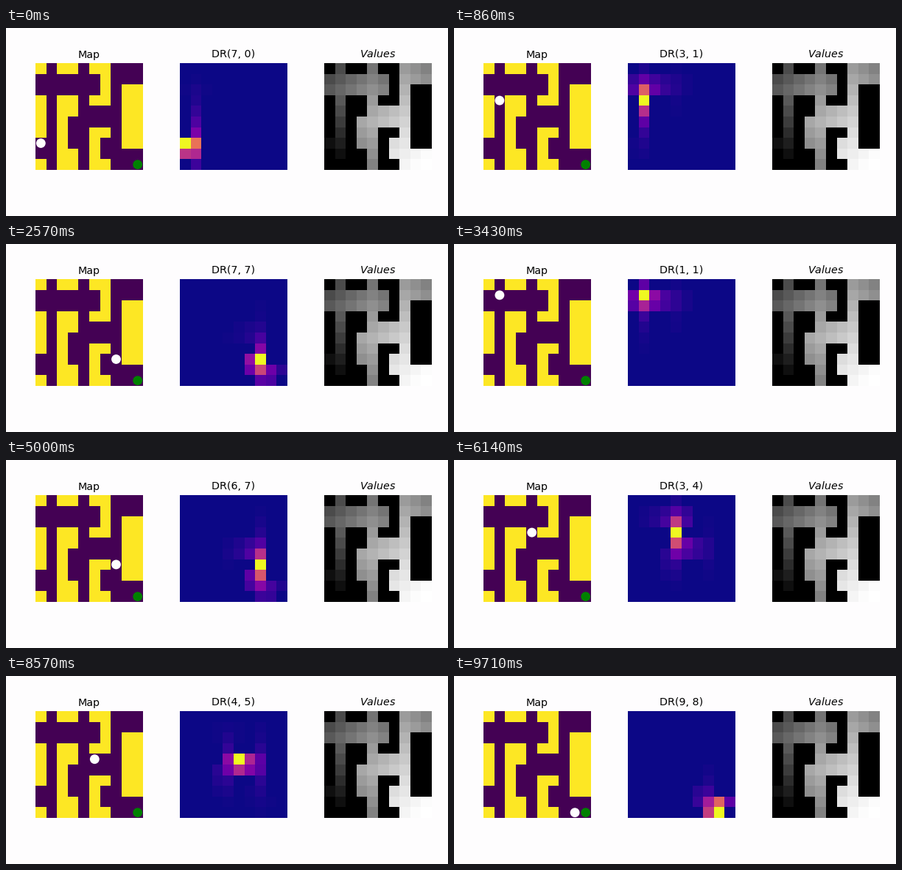
Recreate the animation shown at these times as a matplotlib script. Size 600 px wide and 257 px high, loop 9850 ms.

```python
import matplotlib.pyplot as plt
import numpy as np
from matplotlib.animation import FuncAnimation
from matplotlib.patches import Circle

W, H, DPI = 600, 257, 100
LOOP, TICK, FPS = 9850, 50, 7
BG = "#fefdfe"

MAZE = """
#.##.##...
......#...
......#.##
#.##.##.##
#.##....##
#.#.....##
#.#..##.##
..#..#..##
..##.#....
#.##.##...
""".split()
WALL = np.array([[c == "#" for c in row] for row in MAZE])
CELLS = [(int(r), int(c)) for r, c in np.argwhere(~WALL)]
INDEX = {cell: i for i, cell in enumerate(CELLS)}
GOAL = (9, 9)
STARTS = [(7, 0), (1, 0), (2, 3), (1, 3)]
RIGHT, DOWN, LEFT, UP = (0, 1), (1, 0), (0, -1), (-1, 0)


def neighbours(cell, order=(RIGHT, DOWN, LEFT, UP)):
    steps = [(cell[0] + dr, cell[1] + dc) for dr, dc in order]
    return [s for s in steps if s in INDEX]


def goal_distances():
    dist, queue = {GOAL: 0}, [GOAL]
    for cell in queue:
        for n in neighbours(cell):
            if n not in dist:
                dist[n] = dist[cell] + 1
                queue.append(n)
    return dist


DIST = goal_distances()


def route(start):
    """Greedy walk; the start is shown twice and the goal is not entered."""
    path, cell = [start], start
    while cell != GOAL:
        path.append(cell)
        order = (DOWN, RIGHT, LEFT, UP) if cell[0] >= 7 else (RIGHT, DOWN, LEFT, UP)
        cell = min(neighbours(cell, order), key=DIST.get)
    return path


def representation(cost=1.28, bias=0.13):
    """Discounted occupancy of a random walk that leans towards the goal."""
    T = np.zeros((len(CELLS), len(CELLS)))
    for cell in CELLS:
        near = [n for n in neighbours(cell) if n != GOAL]
        w = np.array([np.exp(bias * (DIST[cell] - DIST[n])) for n in near])
        for n, p in zip(near, w / w.sum()):
            T[INDEX[cell], INDEX[n]] = p
    return np.linalg.inv(cost * np.eye(len(CELLS)) - T)


DR = representation()


def to_grid(levels):
    grid = np.zeros(WALL.shape)
    grid[~WALL] = levels
    return grid


def heat(cell):
    i = INDEX[cell]
    return to_grid(DR[i] / DR[i, i])


def values():
    d = np.array([DIST[cell] for cell in CELLS])
    return to_grid(1 - (d / d.max()) ** 1.35)


fig = plt.figure(figsize=(W / DPI, H / DPI), dpi=DPI, facecolor=BG)


def panel(i, data, cmap, title):
    side, left, top = 146, 40 + 196 * i, 48
    ax = fig.add_axes([left / W, 1 - (top + side) / H, side / W, side / H])
    img = ax.imshow(data, cmap=cmap, vmin=0, vmax=1, interpolation="nearest")
    ax.axis("off")
    text = ax.set_title(title, fontsize=10.3, pad=5.4, family="DejaVu Sans")
    return ax, img, text


PATH = [cell for start in STARTS for cell in route(start)]

map_ax, _, _ = panel(0, WALL.astype(float), "viridis", "Map")
_, heat_img, heat_title = panel(1, heat(PATH[0]), "plasma", "DR")
panel(2, values(), "gray", "$Values$")

map_ax.add_patch(Circle(GOAL[::-1], 0.44, color="green", lw=0))
agent = map_ax.add_patch(Circle(PATH[0][::-1], 0.44, color=BG, lw=0, zorder=3))


def update(i):
    # a step due within this tick is shown from the tick's start
    step = ((i + 1) * TICK * FPS - 1) // 1000
    cell = PATH[step % len(PATH)]
    agent.center = cell[::-1]
    heat_img.set_data(heat(cell))
    heat_title.set_text(f"DR({cell[0]}, {cell[1]})")
    return agent, heat_img, heat_title


anim = FuncAnimation(fig, update, frames=LOOP // TICK, interval=TICK,
                     repeat=True, repeat_delay=0, blit=False)
plt.show()
```
